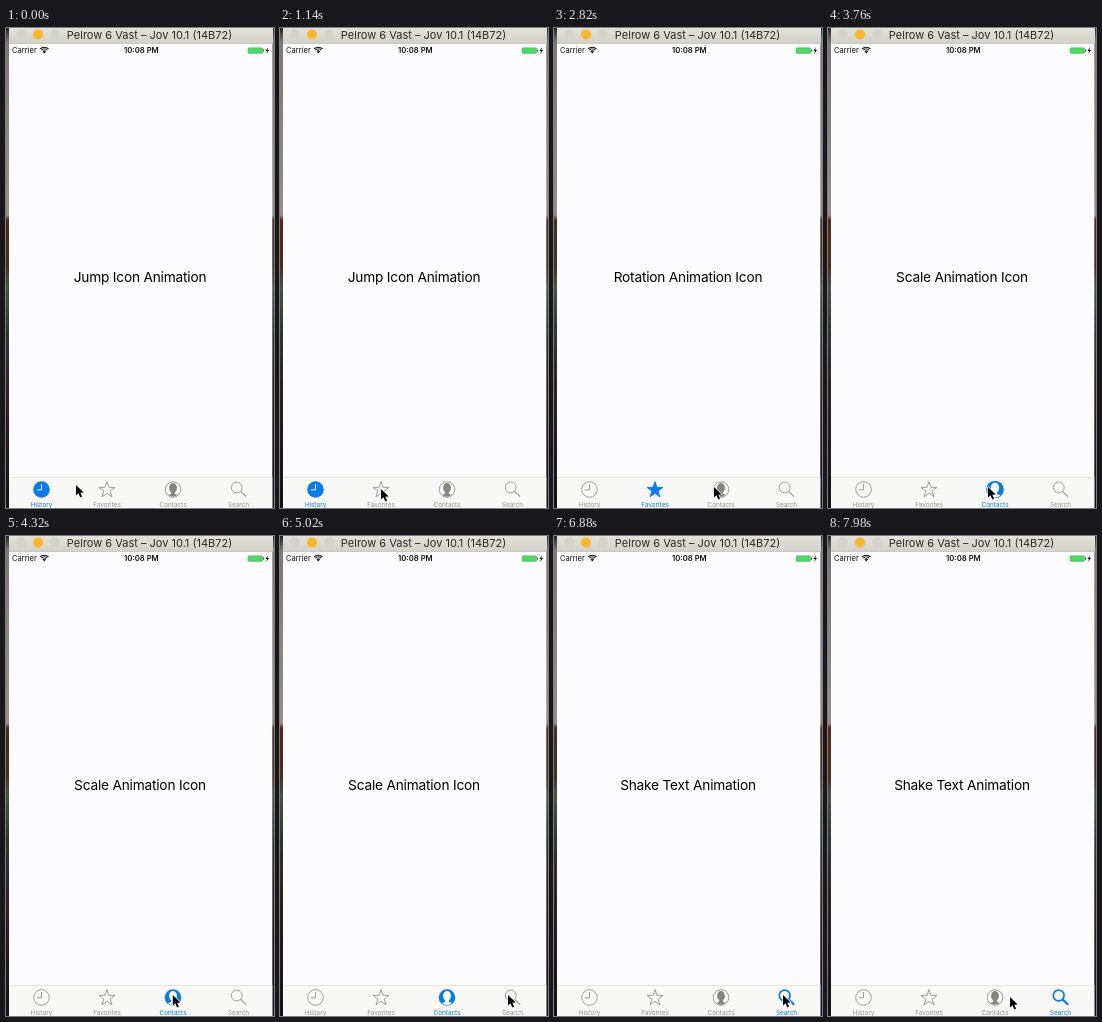
Animation of 268 by 480 pixels, one loop 8 s. Source, as an HTML page with a canvas:

```html
<!DOCTYPE html>
<html lang="en">
<head>
<meta charset="utf-8">
<title>Tab bar icon animations</title>
<style>
html, body { margin: 0; width: 100%; height: 100%; overflow: hidden; background: #fcfbfe; }
canvas { display: block; width: 100vw; height: 100vh; }
</style>
</head>
<body>
<canvas id="stage"></canvas>
<script>
const W = 268, H = 480, LOOP = 8000, TAU = Math.PI * 2;
const canvas = document.getElementById('stage');
const ctx = canvas.getContext('2d');
const FONT = 'Inter, Roboto, sans-serif';
const BLUE = '#087cec', GRAY = '#92928f', BAR = '#f8f8f6';

const tabs = [
  { name: 'History', x: 35.5, title: 'Jump Icon Animation', at: 0, icon: clockIcon },
  { name: 'Favorites', x: 101, title: 'Rotation Animation Icon', at: 1350, icon: starIcon },
  { name: 'Contacts', x: 167, title: 'Scale Animation Icon', at: 3350, icon: personIcon },
  { name: 'Search', x: 232.5, title: 'Shake Text Animation', at: 5350, icon: searchIcon }
];

// Pointer moves: start, end, destination x, y
const pointerStart = [70, 457];
const pointerMoves = [
  [250, 1000, 101, 461],
  [2000, 2700, 160, 459],
  [4180, 4900, 228, 459],
  [5900, 6300, 229, 459],
  [7540, 7960, 182, 461]
];

const clamp = v => Math.max(0, Math.min(1, v));
const ease = p => p * p * (3 - 2 * p);

function text(str, x, y, size, color, { weight = 400, align = 'center', spacing = 0 } = {}) {
  ctx.font = `${weight} ${size}px ${FONT}`;
  ctx.letterSpacing = spacing + 'px';
  ctx.textAlign = align;
  ctx.fillStyle = color;
  ctx.fillText(str, x, y);
}

function disc(x, y, r, color) {
  ctx.beginPath();
  ctx.arc(x, y, r, 0, TAU);
  ctx.fillStyle = color;
  ctx.fill();
}

function ring(x, y, r, color, width) {
  ctx.beginPath();
  ctx.arc(x, y, r, 0, TAU);
  ctx.strokeStyle = color;
  ctx.lineWidth = width;
  ctx.stroke();
}

function path(points, close) {
  ctx.beginPath();
  points.forEach(([x, y]) => ctx.lineTo(x, y));
  if (close) ctx.closePath();
}

function line(points, color, width) {
  path(points);
  ctx.strokeStyle = color;
  ctx.lineWidth = width;
  ctx.stroke();
}

function clockIcon(on) {
  if (on) disc(0, 0, 8.3, BLUE);
  else ring(0, 0, 7.8, GRAY, 0.9);
  line([[0, -5.5], [0, 0.3], [-4.6, 0.3]], on ? '#fff' : GRAY, 0.9);
}

function starIcon(on) {
  const points = Array.from({ length: 10 }, (_, i) => {
    const r = i % 2 ? 3.3 : 8.4, a = i * Math.PI / 5 - Math.PI / 2;
    return [r * Math.cos(a), r * Math.sin(a) + 0.5];
  });
  path(points, true);
  ctx.lineWidth = 0.9;
  ctx.strokeStyle = on ? BLUE : GRAY;
  ctx.fillStyle = BLUE;
  if (on) ctx.fill();
  ctx.stroke();
}

function personIcon(on) {
  if (on) disc(0, 0, 8.3, BLUE);
  ctx.save();
  ctx.beginPath();
  ctx.arc(0, 0, on ? 7.6 : 7.2, 0, TAU);
  ctx.clip();
  ctx.fillStyle = on ? '#fff' : '#85857c';
  ctx.beginPath();
  ctx.ellipse(0, -1.6, 3.9, 4.9, 0, 0, TAU);
  ctx.fill();
  ctx.fillRect(-1.9, 1, 3.8, 4);
  ctx.beginPath();
  ctx.ellipse(0, 8, 6.2, 3.8, 0, 0, TAU);
  ctx.fill();
  ctx.restore();
  if (!on) ring(0, 0, 7.8, GRAY, 0.9);
}

function searchIcon(on) {
  const color = on ? BLUE : GRAY, width = on ? 1.7 : 0.9;
  ring(-1.8, -2, 5.4, color, width);
  line([[2.1, 1.9], [7.6, 7.2]], color, on ? 2.2 : 1.1);
}

function desktop() {
  const g = ctx.createLinearGradient(0, 0, 0, H);
  [[0, '#24231f'], [0.03, '#7d7775'], [0.39, '#9a8c88'], [0.4, '#54281a'],
   [0.5, '#4a3020'], [0.54, '#46543f'], [0.64, '#30342f'], [0.75, '#2a2320'], [1, '#121113']]
    .forEach(([p, c]) => g.addColorStop(p, c));
  ctx.fillStyle = g;
  ctx.fillRect(0, 0, W, H);
}

function windowFrame() {
  ctx.fillStyle = '#fcfbfe';
  ctx.fillRect(3, 15, 263.3, H - 15);
  const g = ctx.createLinearGradient(0, 0, 0, 15);
  g.addColorStop(0, '#e2e1da');
  g.addColorStop(1, '#d3d2ca');
  ctx.fillStyle = g;
  ctx.fillRect(3, 0, 264, 15);
  ctx.fillStyle = '#b9b7aa';
  ctx.fillRect(3, 15, 264, 0.7);
  ['#d3d2cb', '#fdb52a', '#d3d2cb'].forEach((c, i) => disc(15 + 17 * i, 6.5, 5, c));
  text('Pelrow 6 Vast – Jov 10.1 (14B72)', 143.5, 11, 11, '#2a2a28');
}

function statusBar() {
  text('Carrier', 6, 25.2, 7.6, '#111', { align: 'left' });
  text('10:08 PM', 135.3, 25.2, 7.7, '#111', { weight: 600 });
  ctx.strokeStyle = '#111';
  ctx.lineWidth = 1.1;
  [2.6, 4.6, 6.4].forEach(r => {
    ctx.beginPath();
    ctx.arc(38.3, 25.2, r - 0.4, -Math.PI * 0.75, -Math.PI * 0.25);
    ctx.stroke();
  });
  disc(38.3, 24.4, 0.9, '#111');
  ctx.fillStyle = '#4cd964';
  ctx.beginPath();
  ctx.roundRect(242, 19.8, 14.6, 5.6, 1);
  ctx.fill();
  ctx.strokeStyle = '#56a864';
  ctx.lineWidth = 0.5;
  ctx.stroke();
  ctx.fillStyle = '#333';
  ctx.fillRect(257.2, 21.5, 0.9, 2.2);
  path([[262, 19.3], [259.4, 23], [261, 23], [260.3, 26], [263, 22.1], [261.4, 22.1]], true);
  ctx.fillStyle = '#111';
  ctx.fill();
}

// Angle, scale and label offset of a tab, ms after it was tapped
function pose(index, age) {
  const p = clamp(age / 500);
  const wave = Math.sin(p * Math.PI);
  return {
    angle: index === 1 ? TAU * ease(p) : 0,
    scale: index === 2 ? 1 + 0.25 * wave * Math.cos(p * Math.PI * 2) : 1,
    shift: index === 3 ? 3 * (1 - p) * Math.sin(p * Math.PI * 6) : 0
  };
}

function tabBar(t, active) {
  ctx.fillStyle = BAR;
  ctx.fillRect(3, 449, 263.3, H - 449);
  ctx.fillStyle = '#dfdecb';
  ctx.fillRect(3, 449, 263.3, 0.7);
  tabs.forEach((tab, i) => {
    const on = i === active;
    const { angle, scale, shift } = pose(i, on && i ? t - tab.at : LOOP);
    ctx.save();
    ctx.translate(tab.x, 461.5);
    ctx.rotate(angle);
    ctx.scale(scale, scale);
    tab.icon(on);
    ctx.restore();
    text(tab.name, tab.x + shift, 479.4, 6.4, on ? BLUE : GRAY);
  });
}

function pointer(t) {
  let [x, y] = pointerStart;
  for (const [from, to, nx, ny] of pointerMoves) {
    const p = ease(clamp((t - from) / (to - from)));
    x += (nx - x) * p;
    y += (ny - y) * p;
  }
  ctx.save();
  ctx.translate(x, y);
  path([[0, 0], [0, 10.6], [2.5, 8.3], [4.3, 12.4], [6.1, 11.6], [4.3, 7.7], [7.7, 7.5]], true);
  ctx.lineJoin = 'round';
  ctx.lineWidth = 1.2;
  ctx.strokeStyle = '#fff';
  ctx.stroke();
  ctx.fillStyle = '#000';
  ctx.fill();
  ctx.restore();
}

function draw(now) {
  const t = now % LOOP;
  const dpr = window.devicePixelRatio || 1;
  const w = Math.round(innerWidth * dpr), h = Math.round(innerHeight * dpr);
  if (canvas.width !== w || canvas.height !== h) {
    canvas.width = w;
    canvas.height = h;
  }
  ctx.setTransform(w / W, 0, 0, h / H, 0, 0);
  const active = tabs.filter(tab => t >= tab.at).length - 1;
  desktop();
  windowFrame();
  statusBar();
  text(tabs[active].title, 134, 253.6, 13.7, '#000', { spacing: -0.2 });
  tabBar(t, active);
  pointer(t);
}

const start = performance.now();
function loop() {
  draw(performance.now() - start);
  requestAnimationFrame(loop);
}
loop();
</script>
</body>
</html>
```
